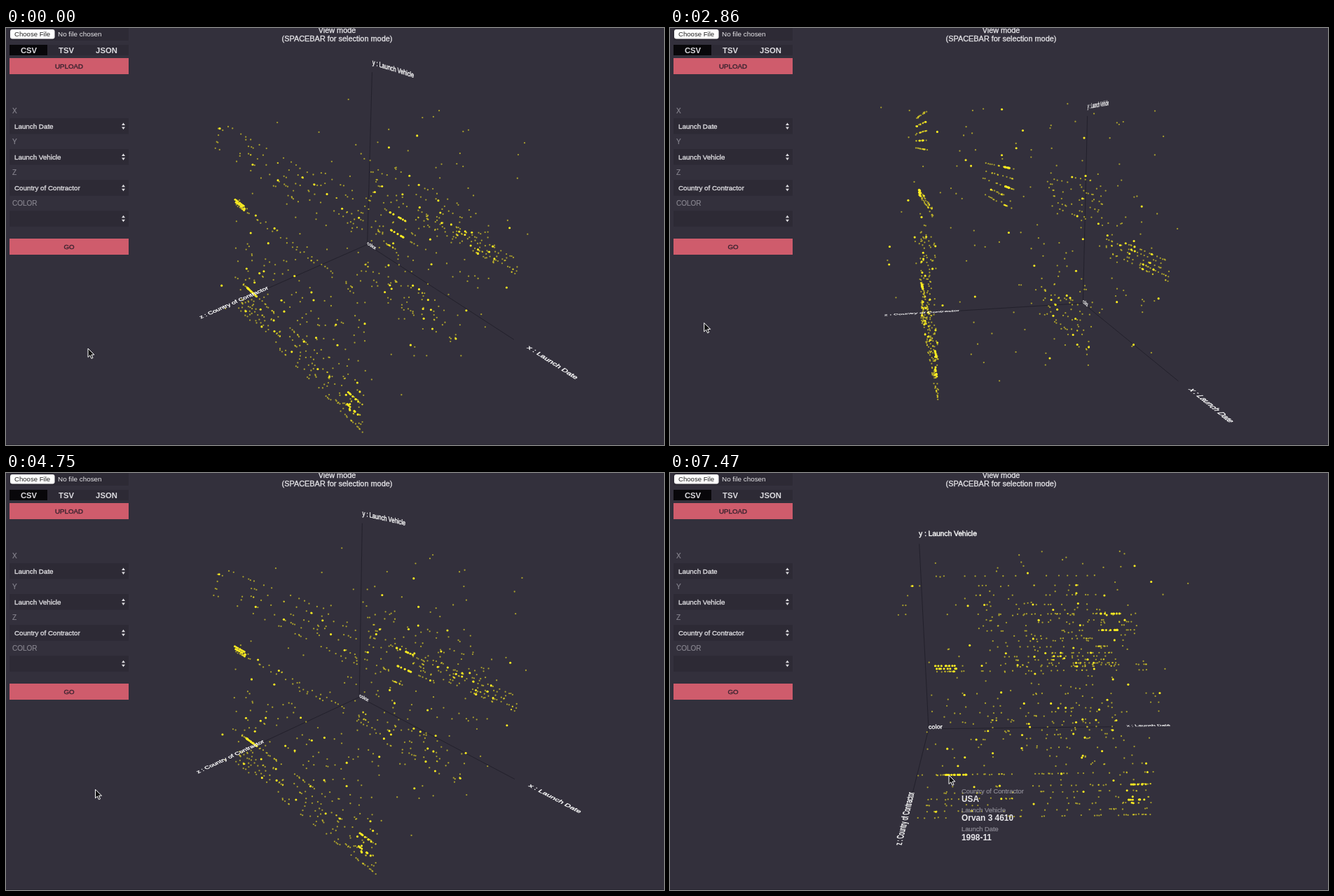
Recreate the animation shown at these times as an HTML page with a canvas. Size 939 by 596 pixels, loop 8 s.

```html
<!DOCTYPE html>
<html lang="en">
<head>
<meta charset="utf-8">
<title>3D scatter view</title>
<style>
  html, body { margin: 0; width: 939px; height: 596px; overflow: hidden; background: #33303c; }
  canvas, svg { position: absolute; left: 0; top: 0; display: block; }
  text { font-family: "Liberation Sans", Arial, sans-serif; }
  .field { font-size: 9.8px; fill: #dddce0; stroke: #dddce0; stroke-width: .35px; }
  .caption { font-size: 10px; fill: #86848e; stroke: #86848e; stroke-width: .2px; }
  .tab { font-size: 11.3px; font-weight: bold; fill: #dddce0; text-anchor: middle; }
  .button { font-size: 9.7px; fill: #3b2430; stroke: #3b2430; stroke-width: .4px; text-anchor: middle; }
  .title { font-size: 10.9px; fill: #e2e1e5; stroke: #e2e1e5; stroke-width: .35px; text-anchor: middle; }
  .hint { font-size: 9.3px; fill: #8f8d97; stroke: #8f8d97; stroke-width: .2px; }
  .value { font-size: 11.9px; font-weight: bold; fill: #e6e5e9; }
</style>
</head>
<body>
<canvas id="plot" width="939" height="596"></canvas>
<svg width="939" height="596" viewBox="0 0 939 596">
  <rect y="595" width="939" height="1" fill="#282631"/>
  <rect x="5" width="170" height="18" fill="#2d2a35"/>
  <rect x="6" y="2" width="63.5" height="13.5" rx="3" fill="#fff"/>
  <text x="12" y="12" font-size="9.6" fill="#222">Choose File</text>
  <text x="74" y="12" font-size="9.9" fill="#e8e7ea">No file chosen</text>
  <rect x="5" y="24" width="170" height="15" fill="#2d2a35"/>
  <rect x="5" y="24" width="54" height="15" fill="#08070a"/>
  <text class="tab" x="32.5" y="35.5">CSV</text>
  <text class="tab" x="86" y="35.5">TSV</text>
  <text class="tab" x="143.5" y="35.5">JSON</text>
  <rect x="5" y="43" width="170" height="23" fill="#cf5c6c"/>
  <text class="button" x="90" y="58">UPLOAD</text>
  <g id="form"></g>
  <rect x="5" y="301" width="170" height="23" fill="#cf5c6c"/>
  <text class="button" x="90" y="316">GO</text>
  <text class="title" x="472.5" y="7">View mode</text>
  <text class="title" x="472.5" y="19">(SPACEBAR for selection mode)</text>
  <g id="tip"></g>
  <path id="cursor" d="M0 0V12.5L2.9 9.8 4.9 14.4 7 13.5 5 9H9Z" fill="#111" stroke="#fff"/>
</svg>
<script>
const LOOP = 8000, STEP = 118.1, FIRST = 380, TIP_STEP = 60;
const CENTER = { x: 480, y: 298 }, FOCAL = 800;
const ORIGIN = [-.168, -.184, -.208], FONT_SIZE = .0142;
const ctx = document.getElementById('plot').getContext('2d');
const tip = document.getElementById('tip');
const cursor = document.getElementById('cursor');

document.getElementById('form').innerHTML =
  [['X', 'Launch Date'], ['Y', 'Launch Vehicle'], ['Z', 'Country of Contractor'], ['COLOR', '']]
    .map(([name, value], i) => `<g transform="translate(0 ${i * 44.1})">
      <text class="caption" x="9" y="122">${name}</text>
      <rect x="5" y="129" width="170" height="22.5" fill="#2d2a35"/>
      <text class="field" x="12" y="143.7">${value}</text>
      <path d="M165 139l2.5-3.5 2.5 3.5zM165 141.5l2.5 3.5 2.5-3.5z" fill="#dddce0"/></g>`).join('');

tip.innerHTML =
  [['Country of Contractor', 'USA'], ['Launch Vehicle', 'Orvan 3 4610'], ['Launch Date', '1998-11']]
    .map(([name, value], i) => `<g transform="translate(416 ${457.5 + i * 27.2})">
      <text class="hint">${name}</text><text class="value" y="12.7">${value}</text></g>`).join('');

const easeIn = f => f * f;
const easeOut = f => f * (2 - f);
const POSES = [
  { at: 262, azimuth: 51.6, elevation: 31.8 },
  { at: 1340, azimuth: 50.3, elevation: 21.8, ease: easeOut },
  { at: 2160, azimuth: 68, elevation: 10.8, ease: easeOut },
  { at: 3570, azimuth: 81.5, elevation: 9.1, ease: easeOut },
  { at: 3690, azimuth: 81.5, elevation: 9.1, ease: easeOut },
  { at: 4750, azimuth: 47.5, elevation: 28.3, ease: easeIn },
  { at: 5690, azimuth: 1.5, elevation: 19.3, ease: easeOut },
  { at: 6280, azimuth: -1.6, elevation: 19.4, ease: easeOut }
];

const mix = (a, b, f) => a + (b - a) * f;
const clamp = f => Math.min(1, Math.max(0, f));

function poseAt(time) {
  const i = Math.max(1, POSES.findIndex(pose => pose.at > time));
  const next = time < POSES[POSES.length - 1].at ? i : POSES.length - 1;
  const a = POSES[next - 1], b = POSES[next];
  const f = b.ease(clamp((time - a.at) / (b.at - a.at)));
  return { azimuth: mix(a.azimuth, b.azimuth, f), elevation: mix(a.elevation, b.elevation, f) };
}

// The pointer drags the view, then glides to the hovered point.
function pointerAt(time, { azimuth, elevation }) {
  const f = clamp((time - 6640) / 820);
  return [
    mix(117 + (51.6 - azimuth) * 2.58, 398, f),
    mix(458 + (elevation - 31.8) * 1.64, 432, f)
  ];
}

let seed = 41;
function random() {
  seed = (seed * 16807) % 2147483647;
  return seed / 2147483647;
}

const points = [];
const addPoint = (x, y, z, bright) => points.push({ p: [x, y, z], bright });

// Each group fills parallel rows in one z plane; a burst is a bright run within a row.
const MAIN = .146, NEAR = .035, FAR = -.19;
const GROUPS = [
  { z: MAIN, y: [-.185, -.128], x: [-.15, .235], rows: 6, count: 150, burst: .19 },
  { z: MAIN, y: [-.106, -.106], x: [-.16, .235], rows: 1, count: 45, burst: -.108 },
  { z: MAIN, y: [-.09, .03], x: [-.14, .235], rows: 9, count: 75 },
  { z: MAIN, y: [.068, .077], x: [-.12, .21], rows: 2, count: 50, burst: -.11 },
  { z: MAIN, y: [.155, .21], x: [-.16, .13], rows: 5, count: 65 },
  { z: NEAR, y: [.074, .13], x: [-.04, .215], rows: 5, count: 60, burst: .15 },
  { z: FAR, y: [-.034, -.004], x: [0, .24], rows: 5, count: 100 },
  { z: -.08, y: [-.15, -.085], x: [-.07, .22], rows: 9, count: 65 },
  { z: -.09, y: [.05, .11], x: [-.06, .24], rows: 7, count: 50 }
];
for (const { z, y, x, rows, count, burst } of GROUPS) {
  for (let i = 0; i < count; i++) {
    const level = mix(...y, rows > 1 ? (i % rows) / (rows - 1) : 0);
    addPoint(mix(...x, Math.pow(random(), .8)), level, z + (random() - .5) * .003, random() < .08);
  }
  for (let i = 0; burst && i < 24; i++) {
    addPoint(burst + .04 * random(), mix(...y, i % 3 / 2), z, i % 3 > 0);
  }
}
for (let i = 0; i < 190; i++) {
  addPoint(
    mix(-.165, .24, Math.pow(random(), .65)),
    mix(-.18, .22, random()),
    mix(-.2, .21, Math.pow(random(), 1.7)),
    random() < .14);
}

function camera({ azimuth, elevation }) {
  const a = azimuth * Math.PI / 180, e = elevation * Math.PI / 180;
  const sa = Math.sin(a), ca = Math.cos(a), se = Math.sin(e), ce = Math.cos(e);
  return ([x, y, z]) => {
    const scale = FOCAL / (1 - (x * sa * ce + y * se + z * ca * ce));
    return [
      CENTER.x + scale * (x * ca - z * sa),
      CENTER.y - scale * (y * ce - (x * sa + z * ca) * se)
    ];
  };
}

const along = (p, dir, length) => p.map((v, i) => v + dir[i] * length);

function drawLabel(project, text, p, dir, up) {
  const width = ctx.measureText(text).width;
  const start = project(p);
  const end = project(along(p, dir, width * FONT_SIZE / 100));
  const below = project(along(p, up, -FONT_SIZE));
  ctx.setTransform(
    (end[0] - start[0]) / width, (end[1] - start[1]) / width,
    (below[0] - start[0]) / 100, (below[1] - start[1]) / 100, ...start);
  ctx.fillText(text, 0, 0);
  ctx.strokeText(text, 0, 0);
  ctx.resetTransform();
}

function drawPlot(project) {
  const [ox, oy, oz] = ORIGIN;
  ctx.clearRect(0, 0, 939, 596);
  ctx.strokeStyle = '#23212c';
  ctx.lineWidth = 1;
  for (const end of [[.25, oy, oz], [ox, .22, oz], [ox, oy, .07]]) {
    ctx.beginPath();
    ctx.moveTo(...project(ORIGIN));
    ctx.lineTo(...project(end));
    ctx.stroke();
  }

  ctx.fillStyle = '#fbec22';
  for (const { p, bright } of points) {
    ctx.globalAlpha = bright ? 1 : .58;
    ctx.beginPath();
    ctx.arc(...project(p), bright ? 1.55 : 1.15, 0, 7);
    ctx.fill();
  }
  ctx.globalAlpha = 1;

  ctx.font = '100px "Liberation Sans", Arial, sans-serif';
  ctx.fillStyle = ctx.strokeStyle = '#fff';
  ctx.lineWidth = 4;
  const right = [1, 0, 0], up = [0, 1, 0], back = [0, 0, -1], left = [-1, 0, 0];
  drawLabel(project, 'x : Launch Date', [.278, oy, oz], right, back);
  drawLabel(project, 'y : Launch Vehicle', [ox, .235, oz], right, up);
  drawLabel(project, 'z : Country of Contractor', [ox + .003, oy, .22], back, left);
  drawLabel(project, 'color', ORIGIN, right, up);
}

function render(time) {
  const step = Math.floor((time - FIRST + 6) / STEP);
  const held = step < 0 ? 0 : FIRST + step * STEP;
  const pose = poseAt(held);
  drawPlot(camera(pose));
  cursor.setAttribute('transform', `translate(${pointerAt(held, pose)})`);
  tip.style.display = step >= TIP_STEP ? '' : 'none';
}

const began = performance.now();
function tick() {
  render((performance.now() - began) % LOOP);
  requestAnimationFrame(tick);
}
tick();
</script>
</body>
</html>
```
